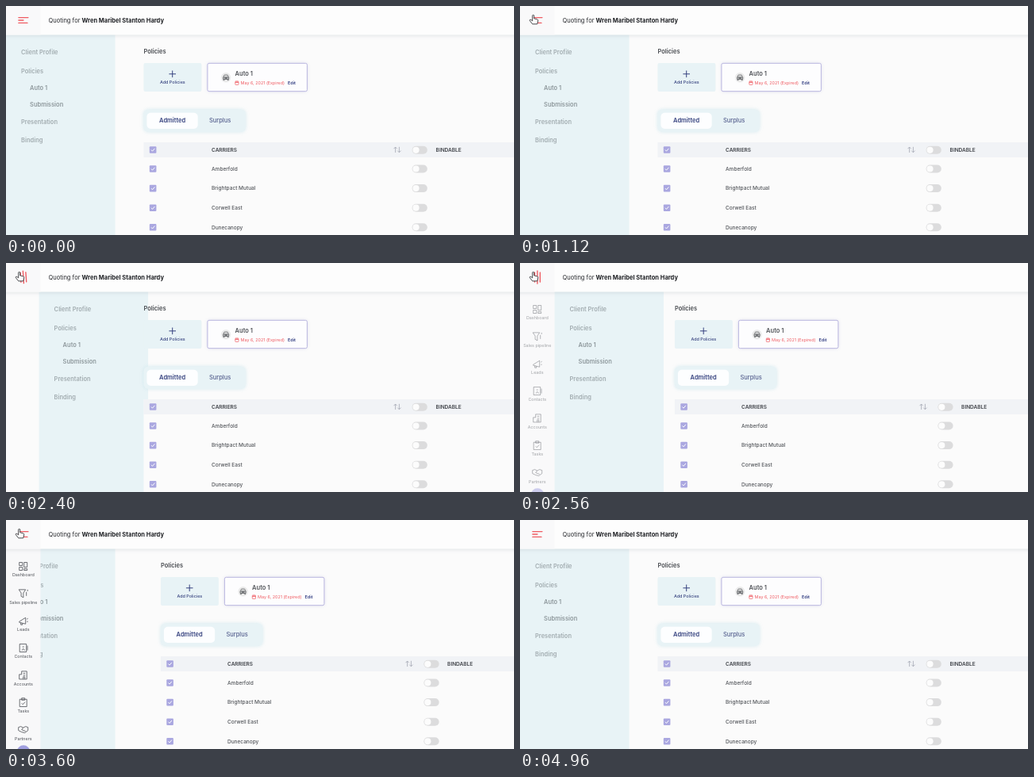
Animation of 640 by 289 pixels, one loop 5.28 s. Source, as an HTML page with a canvas:

```html
<!DOCTYPE html>
<html lang="en">
<head>
<meta charset="utf-8">
<title>Quoting sidebar</title>
<style>
  html, body { margin: 0; width: 100%; height: 100%; overflow: hidden; background: #fbfbfb; }
  canvas { display: block; width: 640px; height: 289px; }
</style>
</head>
<body>
<canvas id="stage"></canvas>
<script>
const W = 640, H = 289, LOOP = 5280, STEP = 80;
const RAIL = 43.5;
const RED = '#ef5b62', NAVY = '#36427f', INK = '#3f4248', PALE = '#e8f3f6', PAGE = '#fbfbfb';
const FONT = 'Inter, "Open Sans", sans-serif';

const canvas = document.getElementById('stage');
const ctx = canvas.getContext('2d');
const dpr = window.devicePixelRatio || 1;
canvas.width = W * dpr;
canvas.height = H * dpr;

const clamp = v => Math.max(0, Math.min(1, v));
const span = (t, start, length) => clamp((t - start) / length);
const easeOut = p => 1 - (1 - p) ** 3;
const easeInOut = p => p * p * (3 - 2 * p);
const mix = (a, b, p) => a + (b - a) * p;

function text(str, x, y, size, weight, color, align = 'left') {
  ctx.font = `${weight} ${size}px ${FONT}`;
  ctx.textAlign = align;
  ctx.textBaseline = 'alphabetic';
  ctx.fillStyle = color;
  ctx.fillText(str, x, y + size * 0.36);
}

function rect(x, y, w, h, color) {
  ctx.fillStyle = color;
  ctx.fillRect(x, y, w, h);
}

function box(x, y, w, h, r, fill, stroke) {
  ctx.beginPath();
  ctx.roundRect(x, y, w, h, r);
  if (fill) { ctx.fillStyle = fill; ctx.fill(); }
  if (stroke) { ctx.strokeStyle = stroke; ctx.stroke(); }
}

function disc(x, y, r, color) {
  ctx.beginPath();
  ctx.arc(x, y, r, 0, Math.PI * 2);
  ctx.fillStyle = color;
  ctx.fill();
}

function path(d, color, width = 1) {
  ctx.strokeStyle = color;
  ctx.lineWidth = width;
  ctx.stroke(new Path2D(d));
}

// Runs a drawing with its own origin and saved state.
function at(x, y, draw) {
  ctx.save();
  ctx.translate(x, y);
  draw();
  ctx.restore();
}

function glow(color, blur, draw) {
  ctx.save();
  ctx.shadowColor = color;
  ctx.shadowBlur = blur * dpr;
  draw();
  ctx.restore();
}

const navItems = [
  ['Client Profile', 58.7], ['Policies', 82], ['Auto 1', 103, true],
  ['Submission', 124, true], ['Presentation', 146.7], ['Binding', 169.7]
];

function drawSidebar(x) {
  rect(x, 36, 137.5, H, PALE);
  for (const [label, y, sub] of navItems) {
    text(label, x + (sub ? 30 : 19), y, 7.5, 600, sub ? '#8e989c' : '#a2acb0');
  }
}

function drawCar() {
  disc(0, 0, 6.2, '#ebebeb');
  box(-4, -1, 8, 3.8, 1, '#77797c');
  path('M-3.2 -.8L-2 -3.2H2L3.2 -.8', '#77797c', 1);
  rect(-3.4, 2, 1.6, 1.8, '#77797c');
  rect(1.8, 2, 1.6, 1.8, '#77797c');
  disc(-2.3, 0.8, 0.7, '#fff');
  disc(2.3, 0.8, 0.7, '#fff');
}

function drawCards() {
  box(0, 72, 73, 36, 2, PALE);
  path('M36.3 81.5V90.1M32 85.8H40.6', NAVY, 1);
  text('Add Policies', 36.4, 95.6, 5.4, 500, NAVY, 'center');

  glow('rgba(90,90,170,.18)', 4, () => box(80.5, 72.3, 125.5, 35.4, 2, '#fdfdfe'));
  ctx.lineWidth = 0.9;
  box(80.5, 72.3, 125.5, 35.4, 2, null, '#b3afdd');
  at(103.7, 90.3, drawCar);
  text('Auto 1', 115.2, 85.2, 7.5, 600, '#505358');
  ctx.lineWidth = 0.7;
  box(115.4, 95.2, 4.2, 4.2, 0.5, null, RED);
  path('M115.4 96.5H119.6M116.5 94.4V95.6M118.5 94.4V95.6', RED, 0.8);
  text('May 6, 2021 (Expired)', 122.2, 97.2, 5.4, 400, RED);
  text('Edit', 181.6, 97.2, 5.4, 600, '#303c80');
}

function drawTabs() {
  glow('rgba(200,228,236,.7)', 4, () => box(0, 130.5, 128.5, 28.5, 6, PALE));
  box(4, 134.7, 64.3, 20.3, 5, '#fdfeff');
  text('Admitted', 36.2, 144.7, 7.5, 600, NAVY, 'center');
  text('Surplus', 96.2, 144.7, 7.5, 500, '#56608f', 'center');
}

function drawCheck(x, y) {
  box(x - 4.3, y - 4.3, 8.6, 8.6, 1, '#aaa7e0');
  path(`M${x - 2.2} ${y}L${x - 0.6} ${y + 1.7}L${x + 2.3} ${y - 1.7}`, '#fff', 1);
}

function drawToggle(x, y) {
  box(x - 9.6, y - 5, 19.2, 10, 5, '#dcdcdd');
  disc(x - 4.7, y, 4.1, '#fcfcfc');
}

const carriers = ['Amberfold', 'Brightpact Mutual', 'Corwell East', 'Dunecanopy'];

function drawTable(left, k) {
  const check = left + 11.7;
  const name = 259 + 20 * k;
  const sort = 493 + 15 * k;
  const toggle = 521.2 + 14.8 * k;

  rect(left, 172, W - left, H - 172, PAGE);
  rect(left, 172, W - left, 19, '#f1f3f6');
  drawCheck(check, 181.5);
  text('CARRIERS', name, 181.5, 6.5, 600, INK);
  at(sort, 181.4, () => {
    path('M-2.4 3.6V-3.4M-4.5 -1.2L-2.4 -3.4L-.3 -1.2', '#a4a7b3', 0.8);
    path('M2.4 -3.6V3.4M.3 1.2L2.4 3.4L4.5 1.2', '#a4a7b3', 0.8);
  });
  drawToggle(toggle, 181.8);
  text('BINDABLE', 541.6 + 14.5 * k, 181.5, 6.5, 600, INK);

  carriers.forEach((label, i) => {
    const y = 205.5 + i * 24.6;
    drawCheck(check, y);
    text(label, name, y, 6.5, 500, '#515459');
    drawToggle(toggle, y);
  });
}

function drawContent(k) {
  const left = 173.4 + 21.5 * k;
  at(left, 0, () => {
    text('Policies', 0, 57.5, 7.5, 600, '#484b50');
    drawCards();
    drawTabs();
  });
  drawTable(left, k);
}

const railItems = [
  ['Dashboard', 'M-5 -5H-1V-1H-5ZM1 -5H5V1H1ZM-5 1H-1V5H-5ZM1 3H5V5H1Z'],
  ['Sales pipeline', 'M-5.5 -5H3L.2 -.8V5L-2.6 3.5V-.8ZM4 -2V3M5.5 -5V-3'],
  ['Leads', 'M-5 1L3 -4V4L-5 2ZM-3 2.5V5H-1V3M4.5 -2L6 -3M4.5 1H6'],
  ['Contacts', 'M-4.5 -5H4V5H-4.5ZM-1.5 3Q0 -1 1.8 3M-1 -1.5H1M5.3 -3V3'],
  ['Accounts', 'M-5 5V-1H-2V-5H4.5V5ZM0 5V2H2V5M0 -2.5H2.5M0 0H2.5'],
  ['Tasks', 'M-4.5 -4H4.5V5.3H-4.5ZM-2 -5.5H2V-3H-2ZM-2 1L-.5 2.5L2.3 -.5'],
  ['Partners', 'M-6 -3L-3 -4L0 -2.5L3 -4L6 -3V1L2 4L-2 3L-6 1ZM0 -2.5L-2 0L3 2']
];

function drawRail(alpha) {
  if (!alpha) return;
  ctx.save();
  ctx.globalAlpha = alpha;
  rect(0, 36, RAIL, H, '#f8f8f9');
  railItems.forEach(([label, icon], i) => {
    const y = 58.5 + i * 34.35;
    at(21.7, y, () => path(icon, '#55585e', 0.85));
    text(label, 21.8, y + 11, 5.4, 400, '#505359', 'center');
  });
  disc(22, 292.5, 8.3, '#a09fdf');
  ctx.restore();
}

function drawMenuIcon(open) {
  at(21.9, 18, () => {
    ctx.rotate(open * Math.PI / 2);
    ctx.lineCap = 'round';
    path('M-6 -3.4H6', RED, 1.4);
    path(`M${mix(-6, -8, open)} 0H${mix(0, 8, open)}`, RED, 1.4);
    path(`M-6 3.4H${mix(5, 6, open)}`, RED, 1.4);
  });
}

function drawHeader(open) {
  glow('rgba(120,130,140,.25)', 5, () => rect(-10, -10, W + 20, 46.5, '#fdfdfd'));
  rect(0, 0, RAIL, 36.5, '#f9f9fa');
  text('Quoting for ', 53.5, 18.3, 7.5, 400, '#2a2c30');
  const nameX = 53.5 + ctx.measureText('Quoting for ').width;
  text('Wren Maribel Stanton Hardy', nameX, 18.3, 7.5, 700, '#1f2125');
  drawMenuIcon(open);
}

const ARROW = new Path2D('M0 0V10L2.4 7.8L4 11.3L5.6 10.6L4.1 7.2H7.2Z');
const HAND = new Path2D('M-1 0Q0 -1 1 0V4L5 5Q6.3 5.4 6 7L5 11H-1L-4.5 6.5Q-4.5 5 -3 5.5L-1 7Z');

function drawCursor(t) {
  if (t < 80 || t >= 4480) return;
  let x, y;
  if (t < 3920) {
    const arrive = easeInOut(span(t, 0, 560));
    const settle = easeInOut(span(t, 560, 560));
    x = mix(655, 19, arrive) - 2.3 * settle;
    y = mix(198, 14, arrive) - 2.2 * settle;
  } else {
    const leave = easeInOut(span(t, 3840, 560));
    x = mix(16.7, 537, leave);
    y = mix(11.8, 196, leave);
  }
  const shape = x < 32 && y < 28 ? HAND : ARROW;
  at(x, y, () => {
    ctx.lineJoin = 'round';
    ctx.fillStyle = '#fff';
    ctx.fill(shape);
    ctx.strokeStyle = '#34363a';
    ctx.lineWidth = 0.9;
    ctx.stroke(shape);
  });
}

function draw(t) {
  const open = easeOut(span(t, 2160, 370)) - easeOut(span(t, 3280, 370));
  const shifted = t >= 2560 && t < 3650;
  const rail = t < 3650 ? span(t, 2440, 240) : 0;

  ctx.setTransform(dpr, 0, 0, dpr, 0, 0);
  rect(0, 0, W, H, PAGE);
  drawSidebar(RAIL * open);
  drawContent(shifted ? 1 : 0);
  drawRail(rail);
  drawHeader(open);
  drawCursor(t);
}

const start = performance.now();
function frame() {
  const t = (performance.now() - start) % LOOP;
  draw(Math.floor(t / STEP) * STEP);
  requestAnimationFrame(frame);
}
frame();
</script>
</body>
</html>
```
